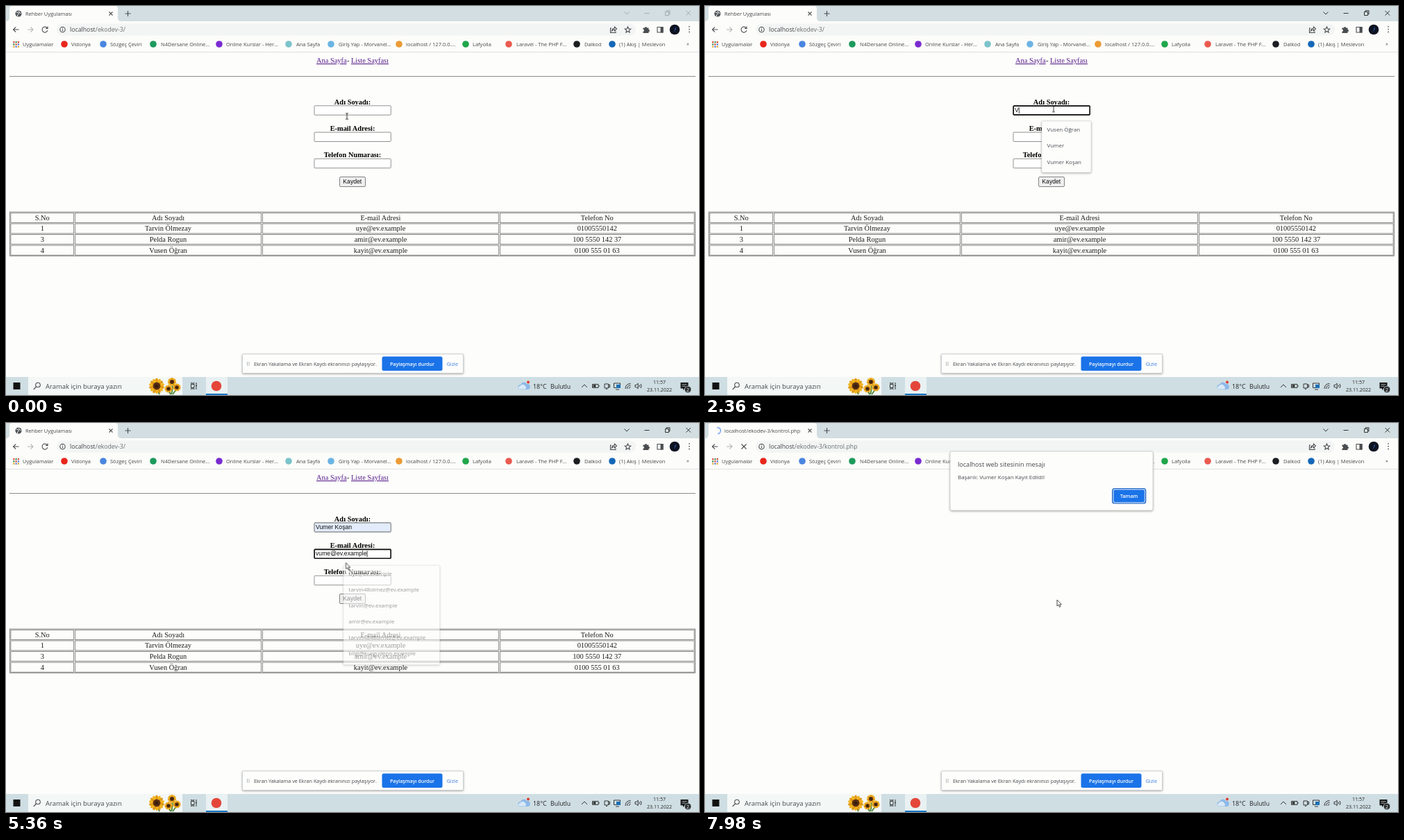
Recreate the animation shown at these times as an HTML page. Size 998 by 561 pixels, loop 8000 ms.

```html
<!DOCTYPE html>
<html lang="tr">
<head>
<meta charset="utf-8">
<title>Rehber Uygulaması</title>
<style>
  html, body { margin: 0; width: 100%; height: 100%; overflow: hidden; background: #fdfdfb; }
  svg { display: block; width: 100vw; height: 100vh; }
  text { font-family: "Open Sans", "Noto Sans", sans-serif; fill: #45484b; white-space: pre; }
  .mark text { font-size: 7.5px; }
  .serif text { font-family: "Liberation Serif", serif; font-size: 10.4px; text-anchor: middle; fill: #1c1c1c; }
  .serif .label { font-weight: bold; fill: #000; }
  .serif .link { fill: #551a8b; text-decoration: underline; text-anchor: start; }
  .form text { font-family: "Liberation Sans", sans-serif; font-size: 8.67px; fill: #111; }
  .popup text { font-size: 7.95px; fill: #4a4d50; }
  .line { fill: none; stroke: #4a4d50; stroke-width: 1.1; }
  .thin { fill: none; stroke: #222; stroke-width: .9; }
  .shadow { filter: drop-shadow(0 1px 1.5px #0005); }
</style>
</head>
<body>
<svg id="stage" viewBox="0 0 998 561">
  <g id="page">
    <g class="serif">
      <text class="link" x="447" y="82">Ana Sayfa</text>
      <text x="492.8" y="82">-</text>
      <text class="link" x="497" y="82">Liste Sayfası</text>
      <path d="M5 101.5H993" stroke="#8d8d8d"/>
      <g id="labels"></g>
      <g id="table"></g>
    </g>
    <g class="form" id="form">
      <rect x="480.5" y="246.5" width="37" height="14" rx="1.5" fill="#efefef" stroke="#767676" stroke-width=".9"/>
      <text x="485.3" y="256.3">Kaydet</text>
    </g>
    <g class="popup" id="popups"></g>
  </g>

  <g id="browser">
    <path fill="#d2dee1" d="M0 0H998V22H0z"/>
    <path fill="#fcfcfa" d="M0 22H998V66H0zM0 22Q5 22 5 17V4Q5 0 9 0H157Q161 0 161 4V17Q161 22 166 22z"/>
    <path d="M0 66.5H998" stroke="#dfe2e2"/>
    <rect x="73" y="25.5" width="834" height="17" rx="8.5" fill="#f3f5f4"/>
    <path class="line" d="M148.5 8.5l5 5m0-5l-5 5M171.5 11h8M175.5 7v8"/>
    <g id="controls">
      <path class="thin" d="M890.5 8.5l3.5 3.5 3.5-3.5M919.5 10.5h7M949.500 8.500h5v5h-5zM951 8.500v-1.800h5v5h-1.500M979.500 7l6.500 6.500m0-6.500l-6.500 6.500"/>
    </g>
    <path class="line" d="M18.500 34h-8m3.700-3.700L10.500 34l3.700 3.700"/>
    <path class="line" stroke-opacity=".4" d="M31 34h8m-3.700-3.700L39 34l-3.700 3.700"/>
    <circle class="line" cx="81.500" cy="34" r="3.700"/>
    <path class="line" d="M81.500 33.500v2.500M81.500 31.500v1"/>
    <path class="line" stroke-width=".9" d="M872 32h-1.500v6.500h7.500v-2M872.500 36q.5-4 4-4v-2l3 3-3 3v-2q-2.500 0-4 2z"/>
    <path class="line" d="M895.500 30l1.200 2.800 3 .3-2.300 2 .7 3-2.600-1.600-2.600 1.600.7-3-2.300-2 3-.3z"/>
    <path fill="#4a4d50" d="M917.500 31.500h2.500a1.500 1.500 0 0 1 3 0h2.500v2.500a1.500 1.500 0 0 1 0 3v2h-8v-2.200a1.500 1.500 0 0 0 0-3z"/>
    <path class="line" d="M938 30.500h8v7.500h-8z"/><path fill="#4a4d50" d="M942.500 30h4v8.500h-4z"/>
    <circle cx="963" cy="34" r="7.300" fill="#0c1220"/><path d="M962 38l2-8 1 3z" fill="#28529a"/>
    <path d="M984 29.800v9" stroke="#4a4d50" stroke-width="1.700" stroke-linecap="round" stroke-dasharray="0 3.800"/>
    <g class="mark" id="marks"><text x="980" y="57">»</text></g>
    <g id="idle">
      <circle cx="18" cy="11" r="4.600" fill="#505458"/>
      <path d="M14.500 9l3 .5 1 2-2 1.500v2M19 7l-.5 2 3 1.500 1-1" fill="none" stroke="#f4f5f4"/>
      <text x="28" y="13.700" font-size="7.400">Rehber Uygulaması</text>
      <path class="line" d="M59.500 32a4 4 0 1 0 .4 3.200M60 29.500v3h-3"/>
      <text x="92" y="37.200" font-size="8.750">localhost<tspan fill="#6a6e71">/ekodev-3/</tspan></text>
    </g>
    <g id="loading">
      <g transform="translate(18 11)"><path id="spinner" d="M0-4.500A4.500 4.500 0 0 1 0 4.500" fill="none" stroke="#5b8def" stroke-width="1.300"/></g>
      <text x="28" y="13.700" font-size="7.500">localhost/ekodev-3/kontrol.php</text>
      <path class="line" d="M52.500 30.500l7 7m0-7l-7 7"/>
      <text x="92" y="37.200" font-size="8.750">localhost<tspan fill="#6a6e71">/ekodev-3/kontrol.php</tspan></text>
    </g>
  </g>

  <g id="dialog">
    <rect class="shadow" x="353" y="41" width="292" height="85" rx="2.500" fill="#fdfdfc" stroke="#c9cccd" stroke-width=".7"/>
    <text x="364" y="63" font-size="9.100">localhost web sitesinin mesajı</text>
    <text x="364" y="81" font-size="7.950">Başarılı: Vumer Koşan Kayıt Edildi!</text>
    <rect x="586.700" y="94.500" width="48" height="21.500" rx="3" fill="#a9c8f3" stroke="#1a62c4" stroke-width="1.200"/>
    <rect x="588.700" y="96.500" width="44" height="17.500" rx="2" fill="#1a73e8"/>
    <text x="610.700" y="107.800" font-size="7.200" font-weight="600" text-anchor="middle" style="fill:#fff">Tamam</text>
  </g>

  <g id="sharing">
    <rect class="shadow" x="340.500" y="502" width="318" height="27.500" rx="1" fill="#fdfdfc" stroke="#c5cbcd" stroke-width=".8"/>
    <path d="M347.500 513v6M350 513v6" stroke="#b5babc"/>
    <text x="357" y="518.500" font-size="7.280">Ekran Yakalama ve Ekran Kaydı ekranınızı paylaşıyor.</text>
    <rect x="541.500" y="505.500" width="87" height="20.500" rx="2.500" fill="#1a73e8"/>
    <text x="585" y="518.500" font-size="7.100" font-weight="600" text-anchor="middle" style="fill:#fff">Paylaşmayı durdur</text>
    <text x="634.500" y="518.500" font-size="7.300" style="fill:#3c7fe0">Gizle</text>
  </g>

  <g id="taskbar">
    <path fill="#cfdee3" d="M0 535H998V561H0z"/>
    <path fill="#f3f7f6" d="M32 535H254V561H32z"/>
    <path fill="#e9f1f2" d="M288 535H319V561H288z"/><path fill="#1579c8" d="M288 559H319V561H288z"/>
    <path fill="#111" d="M10.500 543h10v10h-10z"/>
    <circle class="line" cx="46" cy="546.500" r="3.300"/><path class="line" d="M43.700 549l-4 4"/>
    <text x="57" y="551.500" font-size="9.470">Aramak için buraya yazın</text>
    <g id="flowers"></g>
    <path class="thin" d="M266.500 545.500h4.500v5h-4.500zM266.500 543v1h4.500v-1M266.500 553v-1h4.500v1M274 543v10M273 547.500h2"/>
    <circle cx="303" cy="548" r="7.300" fill="#e4473a"/>
    <path fill="#8db9e8" d="M741 553a3.500 3.500 0 0 1 0-7 5 5 0 0 1 9-1 4 4 0 0 1 1.500 8z"/>
    <path fill="#d9e9f7" d="M739 552.500a3 3 0 0 1 2-5 4 4 0 0 1 7 1 2.500 2.500 0 0 1 0 4z"/>
    <circle cx="752" cy="542.500" r="2" fill="#d93b2f"/>
    <text x="759" y="551.500" font-size="8.900" style="fill:#222">18°C</text>
    <text x="784" y="551.500" font-size="8.700" style="fill:#222">Bulutlu</text>
    <path class="thin" d="M829 550l4-4 4 4M844.500 545.500h8.500v5h-8.500zM854 547v2M862 545h5.500v6H862zM867.500 547l2-1v4l-2-1M864 552.500h2M875.500 544h9v6.500h-9zM878 553h5"/>
    <path fill="#222" d="M845.500 546.500h4v3h-4z"/><path fill="#1a6fb4" d="M879 546h6v5h-6z"/>
    <path class="thin" d="M892 552q0-7 7.500-7.500M894.500 552q0-4.500 5-5M897 552q0-2 2.500-2.500M906 546.500h1.700l2.500-2.200v7.500l-2.500-2.200H906zM912 546.500q1.200 1.500 0 3M914 545q2.200 3 0 6"/>
    <text x="941" y="544.600" font-size="7.060" text-anchor="middle" style="fill:#222">11:57</text>
    <text x="941" y="556.300" font-size="7.060" text-anchor="middle" style="fill:#222">23.11.2022</text>
    <path fill="#151515" d="M971.500 543h11v8.500h-5l-2.500 2.500v-2.500h-3.500z"/>
    <path d="M973.500 545.700h7M973.500 548.200h5" stroke="#cfdee3" stroke-width=".8"/>
    <circle cx="982" cy="553" r="4.800" fill="#2a2d2f" stroke="#cfdee3" stroke-width=".7"/>
    <text x="982" y="555.500" font-size="6.800" text-anchor="middle" style="fill:#fff">2</text>
  </g>

  <g id="pointer">
    <path id="beam" d="M-2-4.200h1.300q.7 0 .7.700v7q0 .7.700.7H2M2-4.200H.7Q0-4.200 0-3.500M0 3.500q0 .7-.7.700H-2" fill="none" stroke="#222" stroke-width=".9"/>
    <path id="arrow" d="M0 0v9l2-1.800 1.500 3.200 1.500-.7-1.400-3h2.700z" fill="#fff" stroke="#222" stroke-width=".8"/>
  </g>
</svg>

<script>
const LOOP = 8000;
const $ = id => document.getElementById(id);

function add(parent, tag, attrs = {}, content = '') {
  const node = document.createElementNS('http://www.w3.org/2000/svg', tag);
  for (const key in attrs) node.setAttribute(key, attrs[key]);
  node.textContent = content;
  return parent.appendChild(node);
}

const at = ms => Math.min(ms, LOOP) / LOOP;
const play = (node, frames) => node.animate(frames, { duration: LOOP, iterations: Infinity });

// Visible from start to end, then fading out; low is the opacity outside that span.
function show(node, start, end = LOOP, fade = 0, low = 0) {
  const steps = [[0, low], [start, low], [start, 1], [end, 1], [end + fade, low], [LOOP, low]];
  play(node, steps.map(([ms, opacity]) => ({ offset: at(ms), opacity })));
  return node;
}

// Bookmarks
for (let i = 0; i < 9; i++) {
  add($('marks'), 'rect', {
    x: 10.2 + i % 3 * 3.3, y: 51 + Math.floor(i / 3) * 3.3, width: 2.2, height: 2.2,
    fill: ['#d9473b', '#e6a728', '#3f8f52', '#4c7fd8'][(i * 2 + (i > 4)) % 4]
  });
}
add($('marks'), 'text', { x: 24, y: 57.8 }, 'Uygulamalar');
[
  [84, '#e8261c', 'Vidonya', 94], [140, '#4a86e0', 'Sözgeç Çeviri', 150],
  [212, '#1d9a5b', 'N4Dersane Online...', 223], [307, '#7a2bd0', 'Online Kurslar - Her...', 317],
  [407, '#7cc3cb', 'Ana Sayfa', 418], [468, '#6cb4e4', 'Giriş Yap - Morvanel...', 479],
  [566, '#ec9b35', 'localhost / 127.0.0....', 576], [662, '#1fa64a', 'Lafyolla', 672],
  [724, '#ea5a4f', 'Laravel - The PHP F...', 735], [822, '#1b1d20', 'Dalkod', 833],
  [873, '#1467b8', '(1) Akış | Meslevon', 883]
].forEach(([cx, fill, name, x]) => {
  add($('marks'), 'circle', { cx, cy: 55, r: 4.8, fill });
  add($('marks'), 'text', { x, y: 57.8 }, name);
});

// Sunflowers in the search box
function flower(x, y, r) {
  const g = add($('flowers'), 'g', { transform: `translate(${x} ${y})` });
  for (let i = 0; i < 14; i++) {
    add(g, 'ellipse', {
      cy: -r * .7, rx: r * .2, ry: r * .36, fill: i % 2 ? '#f3b51f' : '#e29a16',
      transform: `rotate(${i * 360 / 14})`
    });
  }
  add(g, 'circle', { r: r * .52, fill: '#5a3013' });
  add(g, 'circle', { r: r * .25, fill: '#3a1d0b' });
}
add($('flowers'), 'path', {
  d: 'M239 543q2 8-1 17M233 553l4 7M246 552l-6 8M217 552l4 8', fill: 'none', stroke: '#4d8434', 'stroke-width': 1.8
});
[[217, 548, 10.5], [239, 542, 6], [234, 552, 5.5], [246, 550, 5.5]].forEach(f => flower(...f));

// Contact table
const people = ['Tarvin Ölmezay', 'Pelda Rogun', 'Vusen Öğran'];
const shortMails = ['uye@ev.example', 'amir@ev.example', 'kayit@ev.example'];
const phones = ['01005550142', '100 5550 142 37', '0100 555 01 63'];
const border = { fill: 'none', stroke: '#6f6f6f', 'stroke-width': .8 };
const edges = [6, 98.5, 368.5, 710.5, 992];
add($('table'), 'rect', { x: 5.5, y: 297, width: 987, height: 63.5, ...border });
[
  ['S.No', 'Adı Soyadı', 'E-mail Adresi', 'Telefon No'],
  ...people.map((name, i) => [[1, 3, 4][i], name, shortMails[i], phones[i]])
].forEach((row, r) => row.forEach((value, c) => {
  const x = edges[c] + .9, width = edges[c + 1] - edges[c] - 1.8;
  add($('table'), 'rect', { x, y: 298.4 + r * 15.6, width, height: 14, ...border });
  add($('table'), 'text', { x: x + width / 2, y: 308.8 + r * 15.6 }, value);
}));

// Form fields
const fieldY = [150.5, 188.8, 227];
['Adı Soyadı:', 'E-mail Adresi:', 'Telefon Numarası:'].forEach((name, i) => {
  add($('labels'), 'text', { class: 'label', x: 499, y: fieldY[i] - 8.8 }, name);
  add($('form'), 'rect', {
    x: 444, y: fieldY[i] - 6.7, width: 110.3, height: 13.4, rx: 1, fill: '#fff', stroke: '#767676', 'stroke-width': .8
  });
});
const box = (i, attrs) => add($('form'), 'rect', {
  x: 444.2, y: fieldY[i] - 6.4, width: 110, height: 12.8, rx: 1, fill: 'none', ...attrs
});
const autofill = (i, start) => show(box(i, { fill: '#e3ecfa', stroke: '#767676', 'stroke-width': .8 }), start);
const focus = (i, start, end) => show(box(i, { stroke: '#101010', 'stroke-width': 1.6 }), start, end);

// Puts a value into a field, with a blinking caret until caretEnd.
function value(i, string, start, end = LOOP, caretEnd = end) {
  const node = show(add($('form'), 'text', { x: 446, y: fieldY[i] + 2.6 }, string), start, end);
  const x = 446.5 + (string ? node.getComputedTextLength() : 0);
  for (let ms = start; ms < caretEnd; ms += 1060) {
    const caret = add($('form'), 'path', { d: `M${x} ${fieldY[i] - 4.5}v9`, stroke: '#111', 'stroke-width': .8 });
    show(caret, ms, Math.min(ms + 530, caretEnd));
  }
}

autofill(0, 3300);
autofill(2, 6650);
focus(0, 560, 4380);
focus(1, 4380, 5700);
focus(2, 5700, 7700);

const fullName = 'Vumer Koşan', mail = 'vume@ev.example';
value(0, '', 560, 1000);
value(0, '', 1000, 2300);
value(0, 'V', 2300, 2600);
value(0, 'Vu', 2600, 3300);
value(0, people[2], 3300, 3620, 0);
value(0, 'Vumer', 3620, 3840, 0);
value(0, fullName, 3840, 4040, 0);
value(0, fullName, 4040, LOOP, 4380);
value(1, '', 4380, 4640);
for (let n = 1; n < mail.length; n++) value(1, mail.slice(0, n), 4600 + n * 40, 4640 + n * 40);
value(1, mail, 4600 + mail.length * 40, LOOP, 5700);
value(2, '', 5700, 6650);
value(2, phones[0], 6650, 7060, 0);
value(2, phones[0], 7060, LOOP, 7700);

// Suggestion lists; picks are [row, start, end] highlights.
function popup(x, y, width, height, firstRow, pitch, rows, span, picks = []) {
  const g = show(add($('popups'), 'g'), ...span);
  add(g, 'rect', { class: 'shadow', x, y, width, height, rx: 1.5, fill: '#fdfdfc', stroke: '#d5d8d9', 'stroke-width': .6 });
  picks.forEach(([row, start, end]) => show(add(g, 'rect', {
    x, y: firstRow + row * pitch - pitch / 2, width, height: pitch, fill: '#e5e7e8'
  }), start, end));
  rows.forEach((text, i) => add(g, 'text', { x: x + 7.6, y: firstRow + 2.8 + i * pitch }, text));
}
const matches = [people[2], 'Vumer', fullName];
popup(485, 164, 86.5, 146, 178, 23.4, [people[0], 'asd', people[1], ...matches], [1000, 2300]);
popup(485, 166, 71, 74, 178, 23.4, matches, [2300, 4040, 90],
  [[0, 3300, 3620], [1, 3620, 3840], [2, 3840, 4200]]);
popup(486, 205.500, 138.500, 143, 217, 23, [
  shortMails[0], 'tarvin48olmez@ev.example', 'tarvin@ev.example', shortMails[1],
  'tarvin4848olmez@ev.example', 'bilgi@kurgudepo.example'
], [4500, 5300, 140]);
popup(486, 244.500, 77, 139.500, 256, 22.7,
  [phones[0], '01005550188', '0100 555 0177', '8010', phones[2], 'asd'],
  [5900, 7060, 140], [[0, 6650, 7300]]);

// Window state
show($('controls'), 560, LOOP, 0, .3);
show($('page'), 0, 7700);
show($('idle'), 0, 7650);
show($('loading'), 7650);
show($('dialog'), 7780);
$('spinner').animate({ transform: ['rotate(0deg)', 'rotate(360deg)'] }, { duration: 1000, iterations: Infinity });

// Pointer: [ms, x, y]
play($('pointer'), [
  [0, 491, 159], [150, 491, 159], [500, 500, 149.5], [1300, 500, 149.5], [2200, 502, 148.5], [4130, 502, 148.5],
  [4360, 490, 188], [5150, 490, 188], [5300, 489.5, 201.5], [5420, 489.5, 201.5], [5650, 491, 227],
  [6200, 491, 227], [6600, 516.5, 254], [7250, 516.5, 254], [7480, 507, 255], [LOOP, 507, 255]
].map(([ms, x, y]) => ({ offset: at(ms), transform: `translate(${x}px, ${y}px)`, easing: 'ease-in-out' })));
const beam = $('beam'), arrow = $('arrow');
for (const [start, end] of [[0, 5230], [5550, 6330]]) {
  show(start ? beam.parentNode.appendChild(beam.cloneNode()) : beam, start, end);
}
show(arrow.parentNode.appendChild(arrow.cloneNode()), 5230, 5550);
show(arrow, 6330);
</script>
</body>
</html>
```
